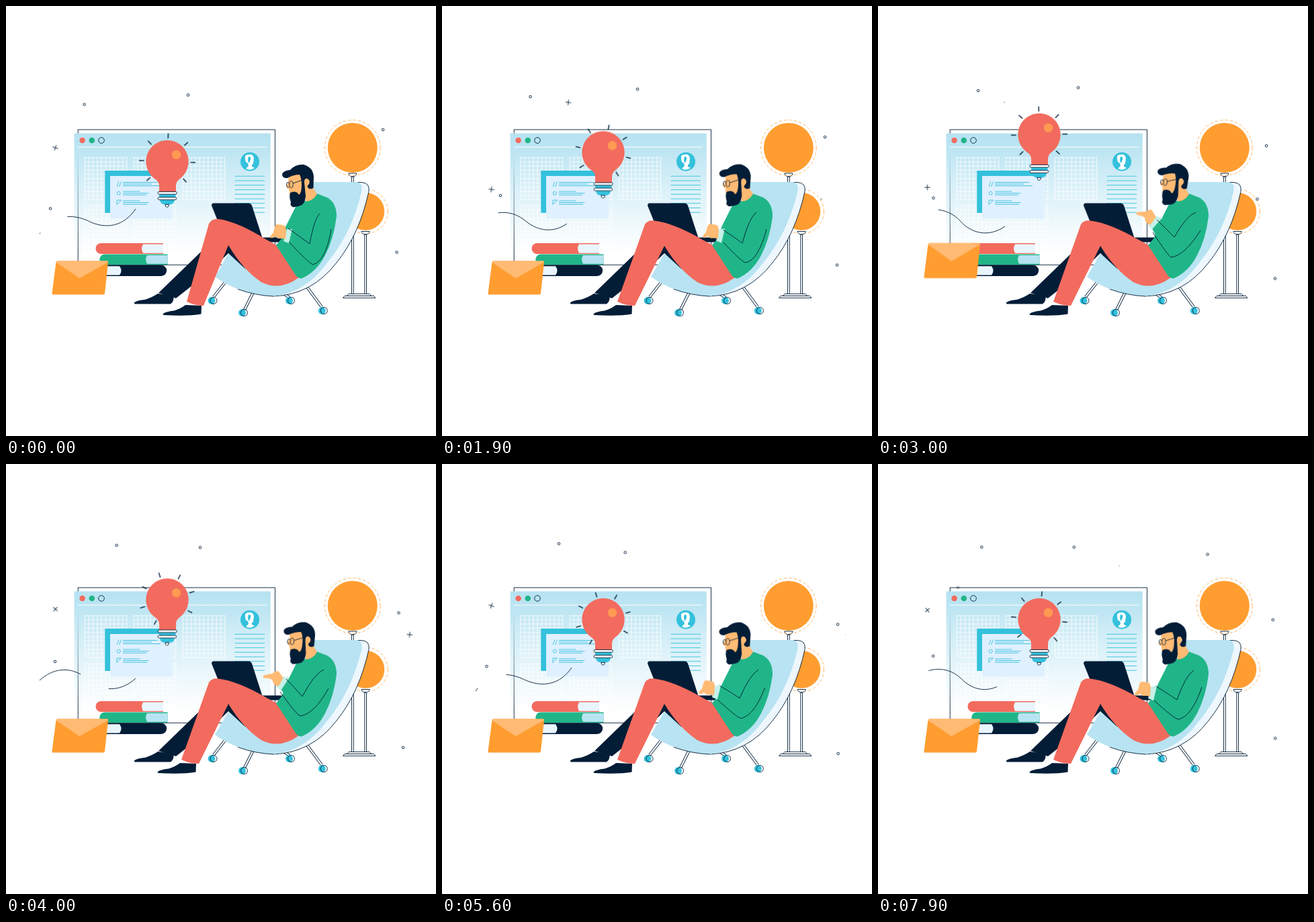
Write an HTML page that moves like this. It is 640 px wide and 640 px high and loops after 8 s.

```html
<!DOCTYPE html>
<html lang="en">
<head>
<meta charset="utf-8">
<title>Working from a lounge chair</title>
<style>
html, body { margin: 0; width: 100%; height: 100%; overflow: hidden; background: #fff; }
svg { display: block; width: 100vw; height: 100vh; }
.navy { fill: #031d37; } .coral { fill: #f26b5e; } .green { fill: #20b588; }
.sky { fill: #b8e3f2; } .cyan { fill: #33c1dc; } .orange { fill: #ff9d30; }
.skin { fill: #ffba73; } .pale { fill: #e9f5fd; } .white { fill: #fff; }
.line { fill: none; stroke: #031d37; stroke-width: .9; }
.line.white { fill: #fff; }
.thin { fill: none; stroke: #33c1dc; stroke-width: .9; }

.bulb, .rays, .mail, .head, .shoe, .leg, .wave, .arm, .hand, .inner, .outer, .star, .dot, .pop {
  animation: 8s linear infinite;
}
.bulb { animation-name: bulb; }
.rays { animation-name: rays; }
.mail { animation-name: mail; transform-origin: 110px 429.5px; }
.head { animation-name: head; transform-origin: 452px 288px; }
.shoe { animation-name: shoe; }
.leg { animation-name: leg; }
.wave { animation-name: wave, trim; }
.arm { animation-name: arm; }
.hand { animation-name: hand; }
.inner { animation-name: inner; }
.outer { animation-name: outer; }
.star { animation-name: star; }
.dA { animation-name: dA; } .dB { animation-name: dB; } .dC { animation-name: dC; }
.dD { animation-name: dD; } .dE { animation-name: dE; }
.p1 { animation-name: p1; } .p2 { animation-name: p2; } .p3 { animation-name: p3; }
.p4 { animation-name: p4; } .p5 { animation-name: p5; } .p6 { animation-name: p6; }

@keyframes bulb {
  0%, 13% { transform: translateY(0); }
  19% { transform: translateY(-5px); }
  23.75% { transform: translateY(-13.5px); }
  31% { transform: translateY(-31px); }
  37.5% { transform: translateY(-40px); }
  41% { transform: translateY(-41px); }
  45% { transform: translateY(-38px); }
  50% { transform: translateY(-29.5px); }
  58.75% { transform: translateY(-7px); }
  64% { transform: translateY(-1.5px); }
  69%, 100% { transform: translateY(0); }
}
@keyframes rays { from { transform: rotate(2deg); } to { transform: rotate(233.5deg); } }
@keyframes mail {
  0%, 30.5% { transform: none; }
  34% { transform: translateY(-15px) scaleY(1.03); }
  37.5% { transform: translateY(-24.5px) scaleY(1.04); }
  41% { transform: translateY(-17px) scaleY(1.02); }
  45% { transform: translateY(0) scaleY(.98); }
  50%, 100% { transform: none; }
}
@keyframes head {
  0% { transform: rotate(0); }
  23.75% { transform: rotate(2.6deg); }
  31% { transform: rotate(5.6deg); }
  37.5% { transform: rotate(7.4deg); }
  43% { transform: rotate(6.2deg); }
  50% { transform: rotate(3.5deg); }
  58.75% { transform: rotate(1.9deg); }
  83.75% { transform: rotate(2.5deg); }
  100% { transform: rotate(2deg); }
}
@keyframes shoe { 0% { transform: translateX(8px); } 22.5%, 100% { transform: none; } }
@keyframes leg {
  0% { d: path("M269 440L302 324Q306 316 316 317Q345 321 388 348L403 356L436 404Q408 425 380 411Q352 392 331 356L294 446Q281 446 269 440Z"); }
  22.5%, 100% { d: path("M261 440L302 325Q306 318.5 316 319.5Q345 323 388 348L403 356L436 404Q408 425 380 411Q352 392 331 357L287 446Q273 446 261 440Z"); }
}
@keyframes wave {
  0% { d: path("M50 339C67 314 93 307 121.5 319.5C150 334 176 327 193 302"); }
  23.75% { d: path("M50 324C77 302 104 303 124.5 320C145 337 171 339 193 318"); }
  37.5% { d: path("M50 316C77 295 106 302 122.5 320C139 339 167 346 193 325"); }
  50% { d: path("M50 322C74 300 102 303 121.5 320.5C141 338 169 341 193 319"); }
  58.75% { d: path("M50 330C71 306 98 305 121.5 320.5C145 336 172 335 193 311"); }
  70% { d: path("M50 338C67 313 93 307 121.5 320.5C150 334 176 328 193 303"); }
  83.75% { d: path("M50 337C68 312 94 306 121.5 319.5C149 335 175 329 193 304"); }
  98.75%, 100% { d: path("M50 321C77 300 105 301 124.5 320C143 339 169 342 193 321"); }
}
@keyframes trim {
  0% { stroke-dashoffset: 69; }
  6% { stroke-dashoffset: 58; }
  12.5% { stroke-dashoffset: 30; }
  18.75% { stroke-dashoffset: -4; }
  23.75% { stroke-dashoffset: -24; }
  30.5% { stroke-dashoffset: -32; }
  37.5% { stroke-dashoffset: -27; }
  43.75% { stroke-dashoffset: -9; }
  50% { stroke-dashoffset: 28; }
  58.75% { stroke-dashoffset: 61; }
  66% { stroke-dashoffset: 68; }
  75% { stroke-dashoffset: 65; }
  83.75% { stroke-dashoffset: 54; }
  91% { stroke-dashoffset: 22; }
  98.75% { stroke-dashoffset: -18; }
  100% { stroke-dashoffset: -21; }
}
@keyframes arm {
  0% { transform: translate(419px, 342px); }
  23.75% { transform: translate(414px, 341.5px); }
  29% { transform: translate(412px, 335px); }
  37.5% { transform: translate(411px, 322px) rotate(28deg); }
  50% { transform: translate(411px, 326px) rotate(20deg); }
  58.75% { transform: translate(408px, 340px); }
  83.75% { transform: translate(408px, 338.5px) rotate(2deg); }
  98.75%, 100% { transform: translate(408px, 341px); }
}
@keyframes hand {
  0%, 26%, 57%, 100% { d: path("M-2 -9L-4 -15Q-10 -17 -15 -17Q-18 -17 -19 -13L-21 -5L-26 1Q-26 4 -22 3L-18 1L-14 4L-8 4L-3 5Z"); }
  34%, 50% { d: path("M-1 -8L-12 -15Q-16 -13 -18 -9Q-20 -7 -24 -5L-30 -1Q-30 2 -28 2L-19 0L-15 1L-12 5L-6 7L-3 5Z"); }
}
@keyframes inner {
  0% { d: path("M467 309Q459 316 452 354Q437 343 420 331"); }
  23.75% { d: path("M468 307Q457 315 447 353Q434 343 418 333"); }
  37.5% { d: path("M473 307Q459 312 441 344Q428 331 415 318"); }
  50% { d: path("M473 306Q459 312 441 346Q429 332 417 320"); }
  58.75% { d: path("M471 306Q458 314 443 349Q430 340 414 331"); }
  83.75% { d: path("M471 306Q458 314 443 348Q430 339 414 330"); }
  98.75%, 100% { d: path("M470 307Q458 314 445 351Q430 341 414 331"); }
}
@keyframes outer {
  0% { d: path("M484 332Q477 378 457 385Q452 384 421 351"); }
  23.75% { d: path("M483 332Q471 378 452 382Q446 381 419 352"); }
  37.5% { d: path("M480 334Q456 372 436 374Q432 372 409 337"); }
  50% { d: path("M480 334Q459 372 438 375Q432 373 408 339"); }
  58.75% { d: path("M481 333Q465 375 446 379Q440 378 410 351"); }
  83.75% { d: path("M480 333Q464 374 444 378Q438 377 410 350"); }
  98.75%, 100% { d: path("M482 332Q467 376 447 380Q441 379 411 352"); }
}
@keyframes star {
  0% { transform: translate(73.5px, 211px) rotate(20deg); }
  11% { transform: translate(73.5px, 216px) rotate(45deg); }
  18% { transform: translate(73.5px, 250px) rotate(75deg); }
  23.75% { transform: translate(73.5px, 273px) rotate(98deg); }
  30.5% { transform: translate(73.5px, 279px) rotate(100deg); }
  37.5% { transform: translate(73.5px, 270px) rotate(90deg); }
  44% { transform: translate(73.5px, 240px) rotate(65deg); }
  50% { transform: translate(73.5px, 216px) rotate(42deg); }
  58.75%, 83.75% { transform: translate(73.5px, 211px) rotate(20deg); }
  98.75% { transform: translate(73.5px, 217.5px) rotate(50deg); }
  100% { transform: translate(73.5px, 219px) rotate(52deg); }
}
@keyframes dA {
  0% { transform: translate(116.5px, 146.5px); }
  23.75% { transform: translate(131.5px, 135px); }
  37.5% { transform: translate(149px, 126px); }
  50% { transform: translate(164.5px, 121px); }
  58.75% { transform: translate(172px, 119px); }
  70% { transform: translate(174px, 118.5px); }
  83.75% { transform: translate(169.5px, 119.7px); }
  100% { transform: translate(153px, 124px); }
}
@keyframes dB {
  0% { transform: translate(271px, 132.5px); }
  23.75% { transform: translate(291px, 123.7px); }
  37.5% { transform: translate(298px, 121.5px); }
  50% { transform: translate(289px, 124.3px); }
  58.75% { transform: translate(280px, 128px); }
  71% { transform: translate(272px, 132px); }
  83.75% { transform: translate(276.5px, 130px); }
  100% { transform: translate(293px, 123.2px); }
}
@keyframes dC {
  0% { transform: translate(561px, 184px); }
  23.75% { transform: translate(570px, 195px); }
  37.5% { transform: translate(578px, 208px); }
  50% { transform: translate(584.5px, 221.5px); }
  58.75% { transform: translate(587px, 230px); }
  75% { transform: translate(590px, 242.5px); }
  83.75% { transform: translate(590px, 242px); }
  100% { transform: translate(587.5px, 231px); }
}
@keyframes dD {
  0% { transform: translate(581.5px, 366.5px); }
  23.75% { transform: translate(588px, 385.5px); }
  37.5% { transform: translate(591px, 405.5px); }
  50% { transform: translate(591px, 422px); }
  58.75% { transform: translate(590px, 429px); }
  69% { transform: translate(589.5px, 431.5px); }
  83.75% { transform: translate(591px, 423.5px); }
  100% { transform: translate(591.3px, 407px); }
}
@keyframes dE {
  0% { transform: translate(66px, 301.5px); }
  12% { transform: translate(77px, 291px); }
  23.75% { transform: translate(87px, 282px); }
  37.5% { transform: translate(82.5px, 285.7px); }
  50% { transform: translate(73px, 294px); }
  58.75% { transform: translate(68px, 299.5px); }
  69% { transform: translate(66px, 301.7px); }
  83.75% { transform: translate(72px, 295px); }
  100% { transform: translate(83px, 285px); }
}
@keyframes p1 {
  0%, 13% { transform: rotate(-30deg) scale(0); }
  20%, 25% { transform: rotate(6deg) scale(1); }
  37.5% { transform: rotate(28deg) scale(.3); }
  40%, 100% { transform: rotate(30deg) scale(0); }
}
@keyframes p2 {
  0%, 36.5% { transform: rotate(-20deg) scale(0); }
  45%, 60% { transform: rotate(6deg) scale(1); }
  72%, 100% { transform: rotate(30deg) scale(0); }
}
@keyframes p3 {
  0%, 73% { transform: rotate(0) scale(0); }
  81%, 87% { transform: rotate(25deg) scale(.9); }
  98.75% { transform: rotate(40deg) scale(.62); }
  100% { transform: rotate(42deg) scale(.5); }
}
@keyframes p4 {
  0%, 22% { transform: scale(0); }
  23.75% { transform: scale(.45); }
  28%, 38% { transform: scale(1); }
  48%, 100% { transform: scale(0); }
}
@keyframes p5 {
  0%, 82% { transform: scale(0); }
  83.75% { transform: scale(.35); }
  90%, 100% { transform: scale(1); }
}
@keyframes p6 {
  0%, 97.5% { transform: scale(0); }
  98.75% { transform: scale(.3); }
  100% { transform: scale(.5); }
}
</style>
</head>
<body>
<svg viewBox="0 0 640 640">
  <defs>
    <linearGradient id="glass" x1="0" y1="0" x2="0" y2="1">
      <stop offset="0" stop-color="#b5e2f1"/>
      <stop offset=".15" stop-color="#bfe6f3"/>
      <stop offset=".92" stop-color="#cfecf6" stop-opacity="0"/>
    </linearGradient>
    <pattern id="cells" width="6.3" height="6.3" patternUnits="userSpaceOnUse">
      <path d="M0 0H6.3M0 0V6.3M6.3 0V6.3M0 6.3H6.3" fill="none" stroke="#fff" stroke-width="1"/>
    </pattern>
    <rect id="grid" width="63" height="63" fill="url(#cells)" stroke="#fff" stroke-width=".6"/>
    <path id="ray" class="line" style="stroke-width:1.4" d="M0 -42V-34.5"/>
    <path id="cross" class="line" d="M-4.3 0H4.3M0 -4.3V4.3"/>
    <circle id="ring" class="line white" r="1.8"/>
    <g id="wheel"><circle class="cyan" r="5.4"/><circle class="line" cx="3" r="5"/></g>
  </defs>

  <!-- Browser window -->
  <rect class="line" x="107.2" y="184" width="293.2" height="201.3"/>
  <rect x="101.5" y="189.5" width="292.3" height="196" fill="url(#glass)"/>
  <path d="M107 210H388" stroke="#fff" stroke-width="1.1"/>
  <circle class="coral" cx="113.6" cy="200" r="4.3"/>
  <circle class="green" cx="127.8" cy="200" r="4.3"/>
  <circle class="line" cx="142" cy="200" r="4.3"/>
  <g opacity=".85">
    <use href="#grid" x="117" y="225.5"/><use href="#grid" x="190" y="225.5"/>
    <use href="#grid" x="263" y="225.5"/>
    <use href="#grid" x="117" y="297"/><use href="#grid" x="190" y="297"/>
  </g>
  <path class="cyan" d="M147.3 245H240V308H147.3Z"/>
  <path d="M155 253H247.8V316.5H155Z" fill="#dff0fe"/>
  <path class="thin" d="M165 269L168 261.5M168.5 269L171.5 261.5M165 289H171.5L165 295.5ZM174 262.5H225.5M174 265H217M174 267.6H230M174 276H199M174 278.6H212.5M174 281.2H209M174 290H199M174 292.6H212.5M174 295.2H210"/>
  <circle class="thin" cx="167.7" cy="278.7" r="2.5"/>
  <circle class="cyan" cx="363" cy="231.7" r="14"/>
  <path class="white" d="M356 223Q362 219 367 222L369 226L368 235L366 236V239L370 241Q363 246 357 242L361 238L360 234Q355 233 356 223Z"/>
  <path class="cyan" d="M361 224Q359 230 361.500 234L364 229L364 225Z"/>
  <path class="thin" d="M340.5 253.3H385M340.5 260H385M340.5 266.7H385M340.5 273.5H385M340.5 280.2H385M340.5 287H385M340.5 293.7H385M340.5 300.5H385M340.5 307.2H385"/>

  <!-- Light bulb -->
  <g class="bulb">
    <g transform="translate(240 231.5)"><g class="rays">
      <use href="#ray"/><use href="#ray" transform="rotate(45)"/>
      <use href="#ray" transform="rotate(90)"/><use href="#ray" transform="rotate(135)"/>
      <use href="#ray" transform="rotate(180)"/><use href="#ray" transform="rotate(225)"/>
      <use href="#ray" transform="rotate(270)"/><use href="#ray" transform="rotate(315)"/>
    </g></g>
    <path class="coral" d="M240 199.8A31.8 31.8 0 0 1 259 257Q253 261 253 268V277H228V268Q228 261 221 257A31.8 31.8 0 0 1 240 199.8Z"/>
    <circle cx="253.5" cy="221.3" r="6.7" fill="#ff9a52"/>
    <path class="cyan" d="M228 279H252.5V287H228ZM229 289H251Q250 295 243 295.5H237Q230 295 229 289Z"/>
    <rect class="line white" x="226" y="276.4" width="28.3" height="3.8" rx="1.9"/>
    <rect class="line white" x="226" y="284.6" width="27.6" height="3.8" rx="1.9"/>
    <path class="line white" d="M236.8 295.4Q237 299.4 239.7 299.4Q242.4 299.4 242.6 295.4Z"/>
  </g>
  <path class="line wave" pathLength="100" stroke-dasharray="70 30" d="M50 339C67 314 93 307 121.5 319.5C150 334 176 327 193 302"/>

  <!-- Books -->
  <path class="coral" d="M141.5 353H234V369H141.5A8 8 0 0 1 141.5 353Z"/>
  <path class="pale" d="M234 354.5H204Q200 361 204 367.7H234Z"/>
  <path class="green" d="M147 369.5H240.5V385H147A7.7 7.7 0 0 1 147 369.5Z"/>
  <path class="sky" d="M240.5 371H210Q206 377 210 383.7H240.5Z"/>
  <path class="navy" d="M140 385.7H231A8.1 8.1 0 0 1 231 402H140Z"/>
  <path class="pale" d="M140 387.3H169Q174 394 169 400.6H140Z"/>
  <g class="mail">
    <path class="orange" d="M76.5 379.5H150.5Q152.3 379.5 152 381.3L147 427.5Q146.7 429.5 145 429.5H70Q68.3 429.5 68.5 427.5L74.5 381.3Q74.8 379.5 76.5 379.5Z"/>
    <path class="skin" d="M76.5 379.5H150.5Q152.3 379.5 152 381.2L109.5 405.3L74.5 381.5Q74.8 379.5 76.5 379.5Z"/>
  </g>

  <!-- Lamps -->
  <path class="line white" d="M514.5 254V428.5H517.3V254ZM509.8 249H522Q521 254 515.9 254Q510.8 254 509.8 249Z"/>
  <circle class="orange" cx="515.8" cy="211" r="37"/>
  <circle class="orange" cx="535.3" cy="305.8" r="28"/>
  <g fill="none" stroke="#ffad55" stroke-width=".9" stroke-dasharray="4.3 3.2">
    <circle cx="515.8" cy="211" r="41.3"/><circle cx="535.3" cy="305.8" r="33"/>
  </g>
  <path class="line white" d="M533.8 340V428.5H536.5V340ZM529 335.5H541.3Q540.3 340 535.2 340Q530 340 529 335.5Z"/>
  <path class="line white" d="M510 428.5H541L543.5 431.5H507.5ZM504 431.5H547.5L550 434.5H501.5Z"/>

  <!-- Chair -->
  <path class="line" style="stroke-width:4" d="M327 410L309 433M368 426L355 452M413 428L422 434M447 417L470 448"/>
  <path stroke="#fff" stroke-width="2.3" d="M327 410L309 433M368 426L355 452M413 428L422 434M447 417L470 448"/>
  <use href="#wheel" x="306" y="438.5"/><use href="#wheel" x="351.5" y="456.5"/>
  <use href="#wheel" x="421.5" y="438.5"/><use href="#wheel" x="470.3" y="453.5"/>
  <path class="line" style="fill:#edf7fd" d="M520 262.5H529Q542 263 540 276Q526 340 492 382Q455 430 398 432L380 425Z"/>
  <path class="sky" d="M458 262H522Q531 263 529.5 275Q515 337 479 381Q445 428 397 432Q345 428 311 403L330 370L430 370Z"/>
  <path class="line" d="M398 432Q372 431 345 421.5"/>

  <!-- Far leg, laptop -->
  <path class="navy" d="M290 366L227 427L253 435L300 398L331 368L357 392L331 354Z"/>
  <path class="navy" d="M191 441.5Q194 438 207 437Q219 433 226 428L249 431Q251 439 245 443.5H192Q190 443 191 441.5Z"/>
  <path class="navy" d="M309 293.5H361Q364.5 293.5 366 297L381.5 345L384 351H360L316 322L306 297Q306 293.5 309 293.5Z"/>
  <path class="navy" d="M372 344.5H412Q416 346 415.5 351.5H384Z"/>

  <!-- Man -->
  <path class="navy shoe" d="M226 458Q229 455 242 453.5Q253 450 259 445L283 446L282.5 458.5Q262 462 227 460Q224.5 459.5 226 458Z"/>
  <path class="coral leg" d="M261 440L302 325Q306 318.5 316 319.5Q345 323 388 348L403 356L436 404Q408 425 380 411Q352 392 331 357L287 446Q273 446 261 440Z"/>
  <path class="green" d="M435 291Q448 293 462 279L478 285Q492 293 492 313Q488 346 475 371Q462 396 440 405.5Q434 406 430 399L402 356L411 345L416 329Z"/>
  <path class="skin" d="M443 268L455 267L463 280Q456 291 446 291Z"/>
  <g class="head">
    <path class="skin" d="M421 250L420 262L417.5 269Q418 272 421 272L422 280L440 287L451 270L448 248Z"/>
    <path class="navy" d="M411 250Q413 245 423 244Q431 235 443 236Q457 240 458 254L457.5 271Q451 274 448.5 269Q452 262 449 257Q444 256 444 262L446 283Q445 296 437 297.5L428 299.5Q422 297.5 424 292Q421 284 423 278Q432 274 436 281Q440 279 440 266Q440 257 437 251Q428 251 419 256Q411 257 411 250Z"/>
    <ellipse class="skin" cx="448" cy="262" rx="3.8" ry="4.6"/>
    <ellipse class="line" cx="424.5" cy="265.5" rx="2.7" ry="5"/>
    <path class="line" d="M427.2 264L441 259M421.5 264Q418 260 417.5 266Q418 271 421 269"/>
  </g>
  <g class="arm">
    <path class="green" d="M4 -11L24 2L30 28L2 10Z"/>
    <path d="M-1 -10L7 -10L2 11L-6 8Z" fill="#c5f1ea"/>
    <path class="skin hand" d="M-2 -9L-4 -15Q-10 -17 -15 -17Q-18 -17 -19 -13L-21 -5L-26 1Q-26 4 -22 3L-18 1L-14 4L-8 4L-3 5Z"/>
  </g>
  <path class="line inner" d="M467 309Q459 316 452 354Q437 343 420 331"/>
  <path class="line outer" d="M484 332Q477 378 457 385Q452 384 421 351"/>

  <!-- Floating marks -->
  <use href="#cross" class="star"/>
  <use href="#ring" class="dot dA"/><use href="#ring" class="dot dB"/>
  <use href="#ring" class="dot dC"/><use href="#ring" class="dot dD"/>
  <use href="#ring" class="dot dE"/>
  <g transform="translate(188 143.5)"><use href="#cross" class="pop p1"/></g>
  <g transform="translate(600.8 254)"><use href="#cross" class="pop p2"/></g>
  <g transform="translate(119 184)"><use href="#cross" class="pop p3"/></g>
  <g transform="translate(564.5 287.3)"><use href="#ring" class="pop p4"/></g>
  <g transform="translate(490.5 134.5)"><use href="#ring" class="pop p5"/></g>
  <g transform="translate(359.5 152)"><use href="#ring" class="pop p6"/></g>
</svg>
</body>
</html>
```
